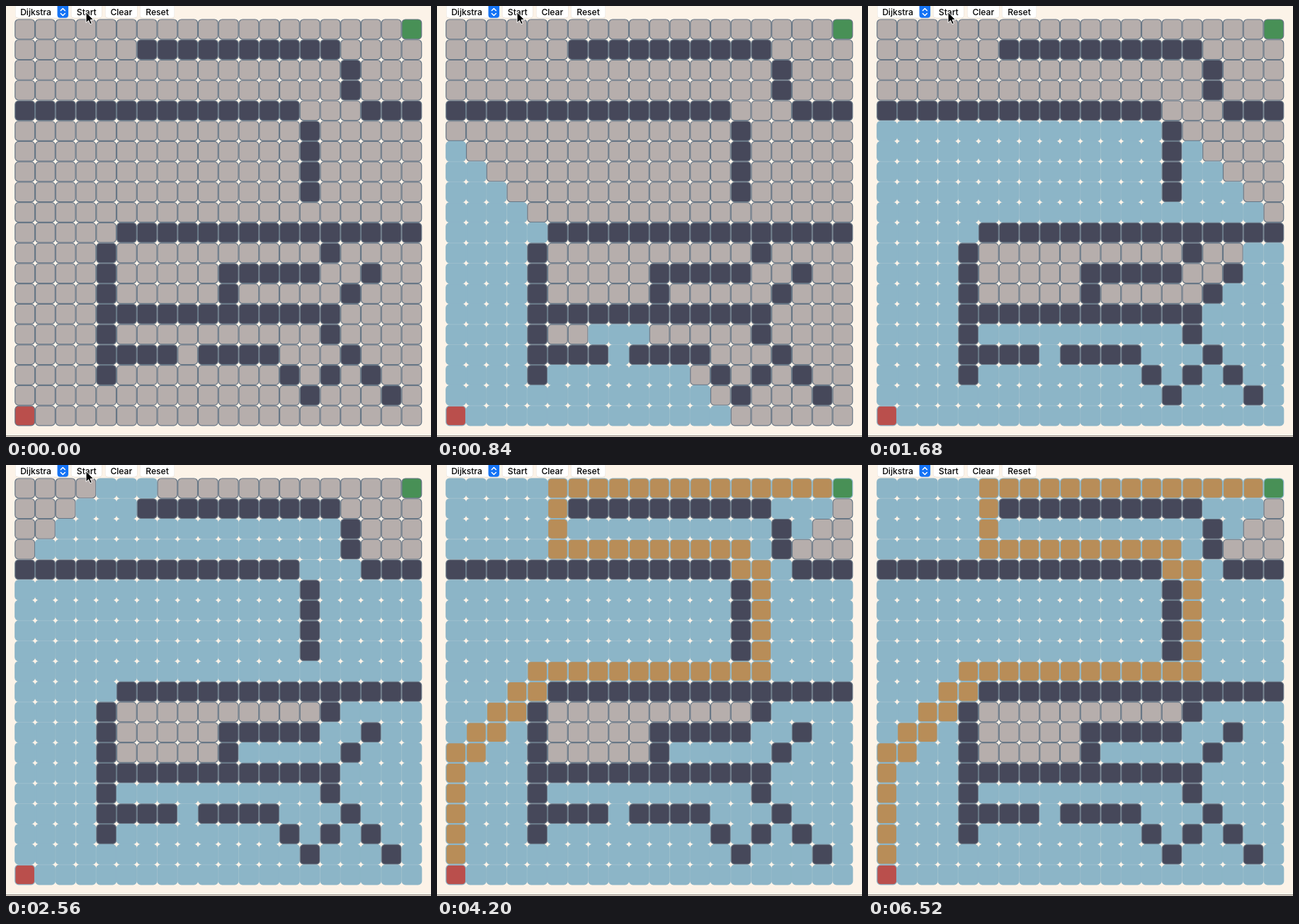
Write an HTML page that moves like this. It is 600 by 609 pixels and loops after 6560 ms.

```html
<!DOCTYPE html>
<html lang="en">
<head>
<meta charset="utf-8">
<style>
  html, body { margin: 0; width: 100%; height: 100%; overflow: hidden; background: #fcf3e8; }
  svg { display: block; }
  text { font: 500 12.1px Inter, "Liberation Sans", sans-serif; fill: #000; text-anchor: middle; }
</style>
</head>
<body>
<svg width="600" height="609" viewBox="0 0 600 609">
  <rect width="600" height="609" fill="#fcf3e8"/>
  <g id="controls"></g>
  <g id="cells"></g>
  <rect y="607" width="600" height="1" fill="#77736e"/>
  <path id="cursor" d="M0 0V15.2L3.5 12L5.8 17.2L8.3 16.1L6 11.1H10.6Z" stroke="#fff"/>
</svg>
<script>
const LOOP = 6560, SEARCH_START = 136, LEVEL_MS = 53.5;
const CURSOR_LEAVES = 3500, CURSOR_GONE = 3800;
const SIZE = 20, PITCH = 28.745, LEFT = 12.3, TOP = 18.5;
const EDGE = '#687786', VISITED = '#8cb5c7';
const FILLS = {
  open: '#b6aeac', wall: '#46485a', visited: VISITED,
  path: '#b88d58', start: '#ba4f4c', goal: '#489056'
};

// Wall strokes as "row,col" corners; segments are straight or diagonal.
const WALL_STROKES = [
  '1,6 1,15 2,16 3,16',
  '4,0 4,13 5,14 8,14',
  '4,17 4,19',
  '10,19 10,5 11,4 17,4',
  '11,15 12,14 12,10 14,10',
  '14,4 14,15 12,17',
  '14,15 15,15 18,18',
  '16,4 16,7',
  '16,9 16,12 18,14 16,16'
];
const UP = [-1, 0], DOWN = [1, 0], WEST = [0, -1], EAST = [0, 1];

const key = (row, col) => row * SIZE + col;
const START = key(SIZE - 1, 0), GOAL = key(0, SIZE - 1);
const clamp = (v, lo, hi) => Math.max(lo, Math.min(hi, v));

function add(parent, name, attrs, text) {
  const node = document.createElementNS('http://www.w3.org/2000/svg', name);
  for (const k in attrs) node.setAttribute(k, attrs[k]);
  if (text) node.textContent = text;
  return parent.appendChild(node);
}

function traceWalls() {
  const walls = new Set();
  for (const stroke of WALL_STROKES) {
    const points = stroke.split(' ').map(p => p.split(',').map(Number));
    let [row, col] = points[0];
    walls.add(key(row, col));
    for (const [toRow, toCol] of points) {
      while (row !== toRow || col !== toCol) {
        row += Math.sign(toRow - row);
        col += Math.sign(toCol - col);
        walls.add(key(row, col));
      }
    }
  }
  return walls;
}

function neighbours(id, directions) {
  const row = Math.floor(id / SIZE), col = id % SIZE;
  return directions
    .map(([dr, dc]) => [row + dr, col + dc])
    .filter(([r, c]) => r >= 0 && c >= 0 && r < SIZE && c < SIZE)
    .map(([r, c]) => key(r, c))
    .filter(n => !walls.has(n));
}

function measureDistances() {
  const dist = new Map([[START, 0]]);
  const queue = [START];
  for (const id of queue) {
    for (const next of neighbours(id, [UP, EAST, DOWN, WEST])) {
      if (dist.has(next)) continue;
      dist.set(next, dist.get(id) + 1);
      queue.push(next);
    }
  }
  return dist;
}

// Walk downhill from the goal; ties alternate between down and sideways.
function findRoute() {
  const route = new Set();
  for (let id = GOAL; id !== START;) {
    route.add(id);
    const odd = (Math.floor(id / SIZE) + id % SIZE) % 2;
    const order = odd ? [DOWN, WEST, EAST, UP] : [WEST, EAST, DOWN, UP];
    id = neighbours(id, order).find(n => dist.get(n) < dist.get(id));
  }
  return route;
}

function drawControls() {
  const group = document.getElementById('controls');
  const button = (x, width, label, center = x + width / 2) => {
    add(group, 'rect', { x, y: -3, width, height: 20.5, rx: 4.5, opacity: .1 });
    add(group, 'rect', { x: x + .4, y: -3, width: width - .8, height: 19.8, rx: 4, fill: '#fff' });
    add(group, 'text', { x: center, y: 13 }, label);
  };
  button(13, 76, 'Dijkstra', 42);
  button(92, 43.5, 'Start');
  button(140, 45.5, 'Clear');
  button(189, 49, 'Reset');
  add(group, 'rect', { x: 72.5, y: -3, width: 15.5, height: 19.8, rx: 4, fill: '#1473f5' });
  add(group, 'path', {
    d: 'M77.3 6.5l3 -3l3 3m-6 4l3 3l3 -3', fill: 'none', stroke: '#fff',
    'stroke-width': 1.5, 'stroke-linecap': 'round', 'stroke-linejoin': 'round'
  });
}

function buildCells() {
  const group = document.getElementById('cells');
  return Array.from({ length: SIZE * SIZE }, (_, id) => add(group, 'rect', {
    x: LEFT + id % SIZE * PITCH + .5,
    y: TOP + Math.floor(id / SIZE) * PITCH + .5,
    width: PITCH - 1, height: PITCH - 1, rx: 5, 'stroke-width': 1.2
  }));
}

const walls = traceWalls();
const dist = measureDistances();
const route = findRoute();
const goalLevel = dist.get(GOAL);
const cells = buildCells();
const cursor = document.getElementById('cursor');

function cellState(id, level, reached) {
  if (id === START) return 'start';
  if (id === GOAL) return 'goal';
  if (walls.has(id)) return 'wall';
  if (level > goalLevel && route.has(id)) return 'path';
  return reached ? 'visited' : 'open';
}

let shownLevel = null;
function showLevel(level) {
  if (level === shownLevel) return;
  shownLevel = level;
  cells.forEach((rect, id) => {
    const reached = dist.get(id) <= Math.min(level, goalLevel);
    rect.setAttribute('fill', FILLS[cellState(id, level, reached)]);
    rect.setAttribute('stroke', reached ? VISITED : EDGE);
  });
}

function render(time) {
  showLevel(clamp(Math.floor((time - SEARCH_START) / LEVEL_MS), -1, goalLevel + 1));
  const p = clamp((time - CURSOR_LEAVES) / (CURSOR_GONE - CURSOR_LEAVES), 0, 1);
  const ease = p * p * (3 - 2 * p);
  cursor.setAttribute('transform', `translate(${113 - 128 * ease} ${8.5 - 6 * ease})`);
  cursor.setAttribute('visibility', p < 1 ? 'visible' : 'hidden');
}

drawControls();
const origin = performance.now();
function tick() {
  render((performance.now() - origin) % LOOP);
  requestAnimationFrame(tick);
}
render(0);
requestAnimationFrame(tick);
</script>
</body>
</html>
```
